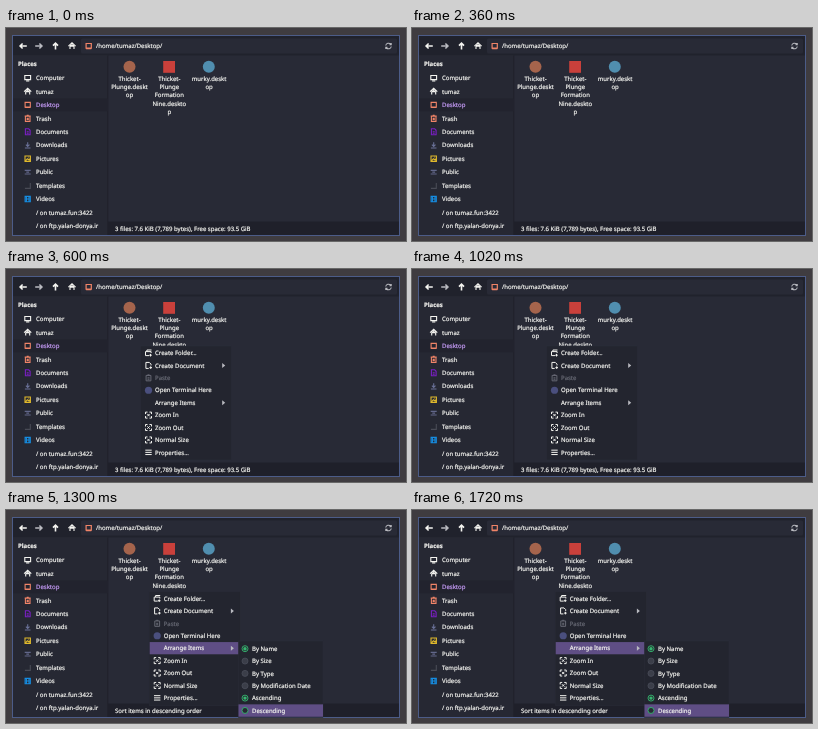
Recreate the animation shown at these times as an HTML page. Size 400x213 px, loop 2 s.

```html
<!DOCTYPE html>
<html lang="en">
<head>
<meta charset="utf-8">
<title>File manager menu</title>
<style>
html, body { margin: 0; height: 100%; overflow: hidden; background: #3f3c40; }
svg { display: block; width: 100%; height: 100%; }
text { font: 6px "Noto Sans", "Open Sans", sans-serif; stroke-width: .2px; text-rendering: geometricPrecision; white-space: pre; }
.heading { font-weight: 600; }
</style>
</head>
<body>
<svg id="stage" viewBox="0 0 400 213"></svg>
<script>
const WHITE = '#f4f4f0', GRAY = '#b9bac0', DIM = '#666873', PURPLE = '#c49af5', CORAL = '#f08468';
const HIGHLIGHT = '#5f4e85', GREEN = '#35b66f', MENU = '#23252f', MENU_EDGE = '#2b2d38';

const rect = (x, y, w, h, fill, extra = '') =>
  `<rect x="${x}" y="${y}" width="${w}" height="${h}" fill="${fill}" ${extra}/>`;
const circle = (x, y, r, fill, extra = '') =>
  `<circle cx="${x}" cy="${y}" r="${r}" fill="${fill}" ${extra}/>`;
// y is the middle of the line; the thin stroke gives the text its weight
const text = (x, y, s, color = WHITE, extra = '') =>
  `<text x="${x}" y="${y + 2.2}" fill="${color}" stroke="${color}" ${extra}>${s}</text>`;

// Small line icons, drawn around their own centre
const shapes = {
  back: 'M3.8 0H-2M-.4-2.5L-2.9 0L-.4 2.5',
  forward: 'M-3.8 0H2M.4-2.5L2.9 0L.4 2.5',
  up: 'M0 3.6V-2M-2.5-.4L0-2.9L2.5-.4',
  home: 'M-3.6 .2L0-3.2L3.6 .2M-2 0V3M2 0V3M-2 .3H2M-2-.5H2M0-2V0',
  reload: 'M-2.8-.5A2.9 2.9 0 0 1 2.2-1.8M2.8 .5A2.9 2.9 0 0 1-2.2 1.8M2.7-3V-1.3H1M-2.7 3V1.3H-1',
  computer: 'M-2.9-2.5H2.9V1.6H-2.9ZM-1.6 3H1.6',
  desktop: 'M-2.6-2.5H2.6V2.2H-2.6ZM-2.6 2.6H2.6',
  trash: 'M-3-2.2H3M-1-3H1M-2.3-2V3H2.3V-2M-.9-.4L.9 1.6M.9-.4L-.9 1.6',
  documents: 'M-2.3-3H1L2.4-1.5V3H-2.3ZM-1 0H1M-1 1.4H1',
  downloads: 'M0-3V1M-1.8-.6L0 1.2L1.8-.6M-2.8 2.8H2.8',
  pictures: 'M-2.7-2.7H2.7V2.7H-2.7ZM-2 2L-.3 0L.7 1L1.5 .3L2.4 2M.8-1.4H1.4',
  public: 'M-3-1.8H3M-1.4 0H1.4M-3 1.8H3',
  templates: 'M2.6-2.6V2.8H-2.8',
  videos: 'M-2.6-2.7H2.6V2.7H-2.6ZM-1.3-2.7V2.7M1.3-2.7V2.7M-1.3 0H1.3',
  folder: 'M.5 2.6H-3V-1.4H2.6V0M-1.6-1.4V-3H3M2 .9V3.5M.7 2.2H3.3',
  newDoc: 'M.2 3H-2.6V-3H.8L2.5-1.3V0M2.2 .9V3.5M.9 2.2H3.5',
  paste: 'M-2.4-2.4H2.4V3H-2.4ZM-1-3H1M-1 0H1M-1 1.4H1',
  zoom: 'M-3-1V-3H-1M1-3H3V-1M3 1V3H1M-1 3H-3V1M-1.2-1.2L1.2 1.2M1.2-1.2L-1.2 1.2',
  lines: 'M-3.2-2.2H3.2M-3.2 0H3.2M-3.2 2.2H3.2',
};
const icon = (name, x, y, color = WHITE, width = 1) =>
  `<path d="${shapes[name]}" transform="translate(${x} ${y})" fill="none" stroke="${color}" stroke-width="${width}"/>`;

function sidebar() {
  const places = [
    ['Computer', 'computer'], ['tumaz', 'home'], ['Desktop', 'desktop', CORAL], ['Trash', 'trash', CORAL],
    ['Documents', 'documents', '#7a1fc4'], ['Downloads', 'downloads', '#6a7198'],
    ['Pictures', 'pictures', '#e0b92c'], ['Public', 'public', '#62678a'],
    ['Templates', 'templates', '#494b56'], ['Videos', 'videos', '#168de2'],
    ['/ on tumaz.fun:3422'], ['/ on ftp.yalan-donya.ir'],
  ];
  return text(12, 36, 'Places', WHITE, 'class="heading"') +
    places.map(([label, shape, color], i) => {
      const y = 50 + 13.45 * i, active = label === 'Desktop';
      return (active ? rect(7, y - 6.5, 95, 13, '#22232e') : '') +
        (shape ? icon(shape, 21.7, y, color, 1.1) : '') +
        text(30, y, label, active ? PURPLE : WHITE);
    }).join('');
}

function files() {
  const names = [
    ['Thicket-', 'Plunge.deskt', 'op'],
    ['Thicket-', 'Plunge', 'Formation', 'Nine.deskto', 'p'],
    ['murky.deskt', 'op'],
  ];
  return circle(123.5, 38.8, 6, '#a5644c') + rect(157.2, 33, 11.8, 11.8, '#c9403b') +
    circle(202.8, 38.8, 6, '#508eaf') +
    names.map((lines, i) => lines.map((line, n) =>
      text(123.5 + 39.8 * i, 50.5 + 8.35 * n, line, WHITE, 'text-anchor="middle"')).join('')).join('');
}

function windowFrame() {
  return rect(6.5, 7.5, 387, 200, '#282a36', 'stroke="#4c5c88"') +
    rect(7, 8, 386, 19.5, '#20222c') +
    rect(75, 10.5, 316, 15, '#282a36', 'rx="1.5"') +
    rect(7, 27.5, 95, 179.5, '#262833') +
    rect(101.5, 27.5, .7, 179.5, '#1c1d26') +
    rect(102, 193.5, 291, 13.5, '#1f202a') +
    icon('back', 17, 18, WHITE, 1.6) + icon('forward', 33, 18, GRAY, 1.6) +
    icon('up', 49.5, 18, WHITE, 1.6) + icon('home', 66, 18, WHITE, 1.1) +
    icon('desktop', 82.7, 18, CORAL, 1.2) + icon('reload', 382.5, 18, GRAY, 1.1) +
    text(90, 18, '/home/tumaz/Desktop/') + sidebar() + files();
}

function menu(dx, dy, open) {
  const items = [
    ['Create Folder...', 'folder'], ['Create Document', 'newDoc'], ['Paste', 'paste'],
    ['Open Terminal Here'], ['Arrange Items'], ['Zoom In', 'zoom'], ['Zoom Out', 'zoom'],
    ['Normal Size', 'zoom'], ['Properties...', 'lines'],
  ];
  const rows = items.map(([label, shape], i) => {
    const y = 84 + 12.42 * i, color = label === 'Paste' ? DIM : WHITE;
    const submenu = label === 'Create Document' || label === 'Arrange Items';
    return (open && label === 'Arrange Items' ? rect(135, y - 6.1, 89, 12.2, HIGHLIGHT) : '') +
      (shape ? icon(shape, 142.5, y, color) : '') +
      (label.startsWith('Open') ? circle(142.5, y, 3.6, '#4a4f7e') : '') +
      (submenu ? `<path d="M216.2 ${y - 2.5}v5l3-2.5z" fill="${GRAY}"/>` : '') +
      text(149, y, label, color);
  }).join('');
  return `<g transform="translate(${dx} ${dy})">` +
    rect(134.5, 77, 91, 114, MENU, `stroke="${MENU_EDGE}" stroke-width=".5"`) + rows + '</g>';
}

function sortMenu() {
  const labels = ['By Name', 'By Size', 'By Type', 'By Modification Date', 'Ascending', 'Descending'];
  return rect(232.5, 131, 84.5, 76.5, MENU, `stroke="${MENU_EDGE}" stroke-width=".5"`) +
    labels.map((label, i) => {
      const y = 138.7 + 12.35 * i, on = i === 0 || i === 4, hover = i === 5;
      return (hover ? rect(232.5, y - 6.1, 84.5, 12.4, HIGHLIGHT) : '') +
        circle(239, y, 3, on || hover ? '#272a33' : '#3b3e49',
          `stroke="${on || hover ? GREEN : '#484b57'}" stroke-width=".9"`) +
        (on ? circle(239, y, 1.7, GREEN) : '') + text(246, y, label);
    }).join('');
}

const status = s => text(109, 200.6, s);
const summary = status('3 files: 7.6 KiB (7,789 bytes), Free space: 93.5 GiB');
const base = windowFrame();
const scenes = [
  base + summary,
  base + summary + menu(0, 0, false),
  base + status('Sort items in descending order') + menu(8.7, 4.5, true) + sortMenu(),
];

const stage = document.getElementById('stage');
let shown = -1;
function draw() {
  const t = performance.now() % 2000;
  const scene = t < 600 ? 0 : t < 1300 ? 1 : 2;
  if (scene !== shown) stage.innerHTML = scenes[shown = scene];
  requestAnimationFrame(draw);
}
draw();
</script>
</body>
</html>
```
